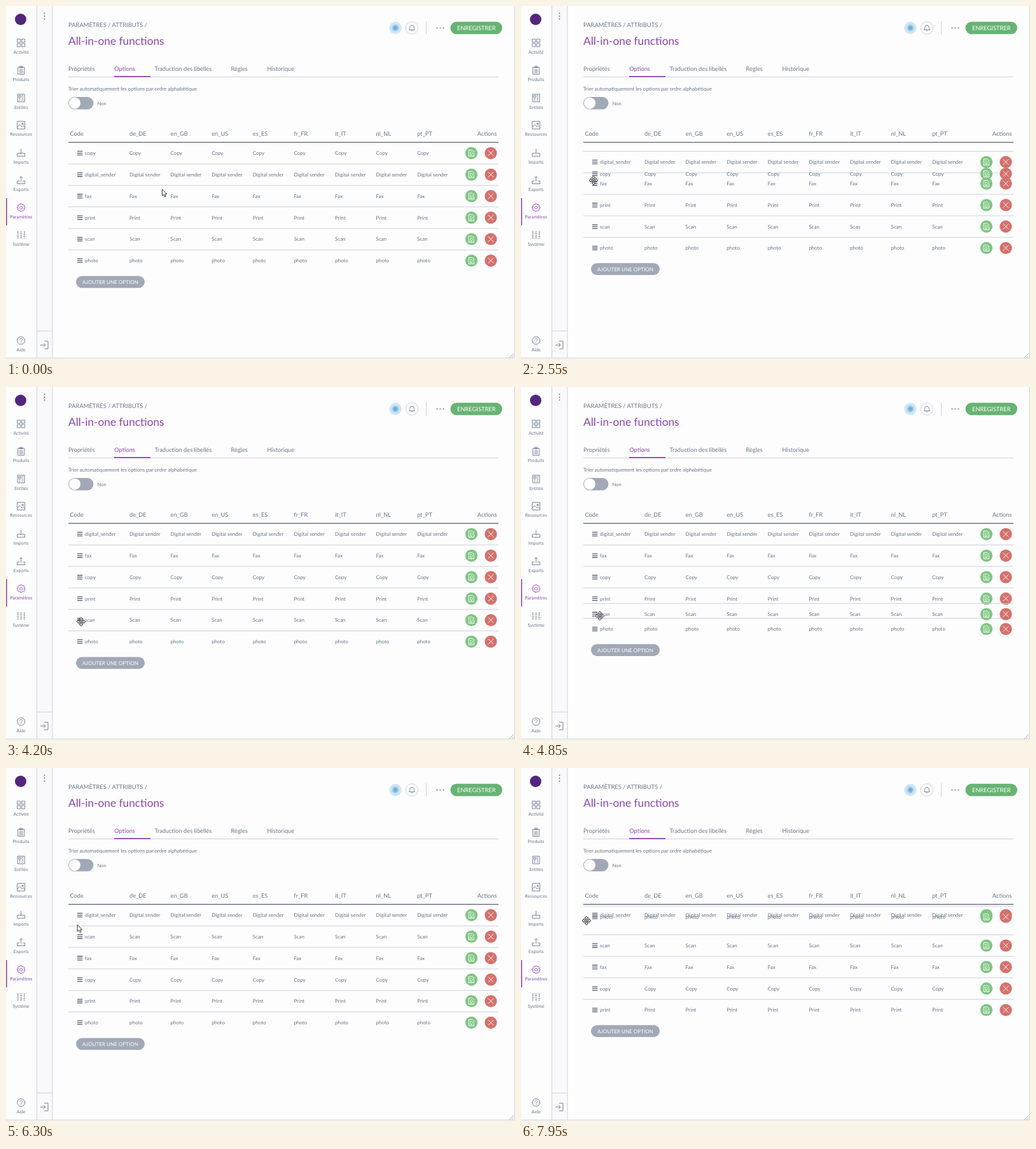
Recreate the animation shown at these times as an HTML page. Size 800 by 555 pixels, loop 8 s.

```html
<!DOCTYPE html>
<html lang="fr">
<head>
<meta charset="utf-8">
<title>Options</title>
<style>
  html, body { margin: 0; width: 100%; height: 100%; overflow: hidden; background: #fdfdfe; }
  svg { display: block; width: 100vw; height: 100vh; font-family: Lato, sans-serif; text-rendering: geometricPrecision; }
  text { fill: #67768a; }
  .icon { fill: none; stroke: #67768a; stroke-width: .9; }
  .icon.on { stroke: #9452ba; }
  text.on { fill: #8a45b0; }
  .rule { stroke: #cdd0d8; stroke-width: 1; }
  .white { fill: none; stroke: #fff; stroke-width: .9; }
</style>
</head>
<body>
<svg id="stage" viewBox="0 0 800 555">
  <defs>
    <radialGradient id="avatar"><stop offset=".2" stop-color="#6aaedb"/><stop offset=".65" stop-color="#cfe5f4"/></radialGradient>
  </defs>
  <rect x="48" width="25" height="554" fill="#f9f9fb"/>
  <path class="rule" d="M48.5 0V554M73 0V554M48 511H73M0 553.5H800M799.5 0V554"/>
  <path d="M791 553L798 546M794.5 553L798 549.5" stroke="#999" stroke-width=".8"/>
  <circle cx="23" cy="21" r="9" fill="#52267d"/>
  <g fill="#67768a">
    <circle cx="60.5" cy="11.5" r="1"/><circle cx="60.5" cy="16" r="1"/><circle cx="60.5" cy="20.5" r="1"/>
    <circle cx="677.5" cy="34.5" r="1"/><circle cx="682.5" cy="34.5" r="1"/><circle cx="687.5" cy="34.5" r="1"/>
  </g>
  <path class="icon" d="M60 527H66V539H60M54 533H62M59 530L62 533L59 536"/>
  <rect y="302" width="1.7" height="43" fill="#9452ba"/>
  <g id="nav"></g>

  <circle cx="612" cy="34.5" r="9.7" fill="url(#avatar)"/>
  <circle cx="638" cy="34.5" r="9.7" fill="#fff" stroke="#cdd0d8"/>
  <path class="icon" d="M633.5 37.5C635 36 634.5 35 634.8 33C635.2 29.5 640.8 29.5 641.2 33C641.5 35 641 36 642.5 37.5ZM637 39H639"/>
  <path class="rule" d="M660.5 24V45"/>
  <rect x="698.5" y="24.7" width="81.5" height="19.6" rx="9.8" fill="#67b373"/>
  <g id="words"></g>
  <path class="rule" d="M98 111.5H774"/>
  <path d="M170 111H227" stroke="#9452ba" stroke-width="1.8"/>
  <rect x="98" y="143" width="39.5" height="19.5" rx="9.75" fill="#a1a9b7"/>
  <circle cx="108" cy="152.7" r="9" fill="#fff"/>
  <g id="add">
    <rect x="110" y="-9.4" width="108" height="18.8" rx="9.4" fill="#a1a9b7"/>
    <text x="164" y="2.9" font-size="8.1" text-anchor="middle" style="fill:#fff">AJOUTER UNE OPTION</text>
  </g>
  <g id="rows"></g>
  <path d="M98 214.4H774" stroke="#566274" stroke-width="1.1"/>
  <path id="arrow" d="M0 0V10.5L2.4 8.3L4.1 12L5.8 11.2L4.2 7.6H7.4Z" fill="#fff" stroke="#222" stroke-width=".9"/>
  <g id="move">
    <path d="M0 -7L2.6 -4.2H1V-1H4.2V-2.6L7 0L4.2 2.6V1H1V4.2H2.6L0 7L-2.6 4.2H-1V1H-4.2V2.6L-7 0L-4.2 -2.6V-1H-1V-4.2H-2.6Z" fill="#fff" stroke="#222" stroke-width=".9"/>
    <path d="M-4.5 -4.5L4.5 4.5M4.5 -4.5L-4.5 4.5" stroke="#222" stroke-width=".8" stroke-dasharray="2 1"/>
  </g>
</svg>
<script>
const LOOP = 8000, FIRST_Y = 231.3, ROW_H = 33.8, GAP = 14;
const $ = id => document.getElementById(id);
const place = (el, x, y) => el.setAttribute('transform', `translate(${x} ${y})`);
const show = (el, on) => el.setAttribute('visibility', on ? 'visible' : 'hidden');
const label = (s, x, y, size, extra = '') =>
  `<text x="${x}" y="${y}" font-size="${size}" ${extra}>${s}</text>`;

// Left navigation: label, icon centre, icon path
const nav = [
  ['Activité', 58, 'M-6 -6H-1V-1H-6ZM1 -6H6V-1H1ZM-6 1H-1V6H-6ZM1 1H6V6H1Z'],
  ['Produits', 101.3, 'M-5 -5H5V6H-5ZM-2 -6.5H2V-4H-2ZM-3 -1H3M-3 1.3H3M-3 3.6H3'],
  ['Entités', 144.7, 'M-5.5 -6H5.5V6H-5.5ZM-3.5 -4H-.5V-1H-3.5ZM1 -4H3.5M1 -1.5H3.5M-3.5 1H-1M1 1H3.5M-3.5 3.5H-1M1 3.5H3.5'],
  ['Ressources', 187.3, 'M-6 -6H6V6H-6ZM-6 3L-2 -1L1.5 3L3.5 1L6 3.5M1.5 -3H3.5V-1H1.5Z'],
  ['Imports', 230.7, 'M-2.5 1H-6V5.5H6V1H2.5M0 -6V2M-2.5 -.5L0 2L2.5 -.5'],
  ['Exports', 274, 'M-2.5 1H-6V5.5H6V1H2.5M0 2V-6M-2.5 -3.5L0 -6L2.5 -3.5'],
  ['Paramètres', 317, 'M-1.3 -6H1.3L1.8 -4.3L3.8 -5L5.3 -3L4.3 -1.5L6.2 -.8V1L4.5 1.6L5 4L3 5.3L1.6 4.3L.8 6H-1L-1.6 4.4L-3.8 5L-5.3 3.2L-4.4 1.6L-6.2 .8V-1L-4.4 -1.6L-5 -3.8L-3.2 -5.2L-1.7 -4.3ZM-2.2 0A2.2 2.2 0 1 0 2.2 0A2.2 2.2 0 1 0 -2.2 0'],
  ['Système', 360, 'M-5 -6V0M-5 3V6M0 -6V-4M0 -1V6M5 -6V1M5 4V6M-6.5 1.5H-3.5M-1.5 -2.5H1.5M3.5 2.5H6.5'],
  ['Aide', 526, 'M-6 0A6 6 0 1 0 6 0A6 6 0 1 0 -6 0M-1.8 -1.5C-1.8 -4 1.8 -4 1.8 -1.5C1.8 0 0 0 0 1.6M0 2.6V3.6']
];
$('nav').innerHTML = nav.map(([s, y, d]) => {
  const on = s === 'Paramètres' ? 'on' : '';
  return `<path class="icon ${on}" d="${d}" transform="translate(23.7 ${y})"/>` +
    label(s, 23.7, y + 16.8, 7.1, `text-anchor="middle" class="${on}"`);
}).join('');

const langs = ['de_DE', 'en_GB', 'en_US', 'es_ES', 'fr_FR', 'it_IT', 'nl_NL', 'pt_PT'];
const colX = i => 194 + i * 64.6;
$('words').innerHTML = [
  label('PARAMÈTRES / ATTRIBUTS /', 98, 33.2, 9.4),
  label('All-in-one functions', 98, 61.3, 17.3, 'class="on"'),
  label('ENREGISTRER', 739.3, 37.9, 9.3, 'text-anchor="middle" style="fill:#fff"'),
  label('Propriétés', 98, 101.5, 9.25),
  label('Options', 170.3, 101.5, 9.25, 'class="on"'),
  label('Traduction des libellés', 233.5, 101.5, 9.25),
  label('Règles', 353.6, 101.5, 9.25),
  label('Historique', 410.6, 101.5, 9.25),
  label('Trier automatiquement les options par ordre alphabétique', 98, 133.4, 8),
  label('Non', 143.8, 155.9, 7.4),
  label('Code', 100.5, 204.3, 9.25),
  ...langs.map((s, i) => label(s, colX(i), 204.3, 9.25)),
  label('Actions', 771.5, 204.3, 9.25, 'text-anchor="end"')
].join('');

// Table rows, drawn around their own centre line
const values = { copy: 'Copy', digital_sender: 'Digital sender', fax: 'Fax', print: 'Print', scan: 'Scan', photo: 'photo' };
const rows = {};
for (const [code, value] of Object.entries(values)) {
  const g = rows[code] = document.createElementNS('http://www.w3.org/2000/svg', 'g');
  g.innerHTML = `<path class="rule" d="M98 -16.8H774"/>
    <path d="M112 -2.9H120.3M112 0H120.3M112 2.9H120.3" stroke="#4f5d70" stroke-width="1.3"/>` +
    label(code, 124, 2.9, 8) +
    langs.map((_, i) => label(value, colX(i), 2.9, 8)).join('') +
    `<circle cx="731.5" r="9.6" fill="#80c584"/>
    <path class="white" d="M733 -4.7H727.3V5H735.5V0M733 -4.7L735.5 -2M729 -1.5H732M729 1H731M729 3.2H733.5M731.7 2L736 -3"/>
    <circle cx="762" r="9.6" fill="#d4716c"/>
    <path class="white" d="M757.7 -4.3L766.3 4.3M766.3 -4.3L757.7 4.3"/>`;
  $('rows').append(g);
}

// Each drag: path of the row as [time, y], and the slots its gap takes as [time, index]
const drags = [
  { code: 'copy', end: 2950, path: [[2200, 231.3], [2550, 263.7], [2950, 298]], slots: [[2200, 0], [2600, 1], [2800, 2]] },
  { code: 'scan', end: 5960, path: [[4750, 366.5], [4850, 357.3], [5450, 267], [5550, 246]], slots: [[4750, 4], [5050, 3], [5250, 2], [5500, 1]] },
  { code: 'photo', end: LOOP, path: [[7300, 400.3], [7400, 371.5], [7650, 305], [7950, 234]], slots: [[7300, 5], [7500, 4], [7700, 3], [7800, 2], [7900, 1]] }
];
const pointer = [
  [50, 245.5, 288], [800, 190, 270], [900, 190, 270], [1700, 114, 240], [2200, 114, 240], [2550, 114, 274],
  [2950, 110, 307], [3350, 104, 293], [3450, 104, 293], [4200, 118, 369], [4300, 118, 369], [4600, 124, 372],
  [4750, 124, 372], [4850, 124, 360], [5450, 117, 267], [5550, 114, 247], [5950, 114, 247], [6750, 110, 246],
  [6850, 110, 246], [7200, 122, 402], [7300, 122, 402], [7400, 123, 361], [7950, 103, 240]
];
const moveSpans = [[1650, 3000], [4200, 6000], [7150, LOOP]];

function along(keys, t) {
  const i = keys.findIndex(k => k[0] > t);
  if (i === 0) return keys[0].slice(1);
  if (i < 0) return keys[keys.length - 1].slice(1);
  const [a, b] = [keys[i - 1], keys[i]], p = (t - a[0]) / (b[0] - a[0]);
  return a.slice(1).map((v, j) => v + (b[j + 1] - v) * p);
}

function draw(t) {
  let order = Object.keys(values), active = null, gap = 9, first = order[0];
  for (const d of drags) {
    const past = d.slots.filter(s => s[0] <= t);
    if (!past.length) break;
    order = order.filter(c => c !== d.code);
    const slot = past[past.length - 1][1];
    if (t < d.end) { active = d; gap = slot; break; }
    order.splice(slot, 0, d.code);
    first = order[0];
  }
  order.forEach((c, i) => place(rows[c], 0, FIRST_Y + i * ROW_H + (i >= gap ? GAP : 0)));
  for (const c in rows) show(rows[c].firstChild, c !== first);
  if (active) {
    place(rows[active.code], 0, along(active.path, t)[0]);
    if ($('rows').lastChild !== rows[active.code]) $('rows').append(rows[active.code]);
  }
  place($('add'), 0, active ? 413.7 : 433.8);

  const [x, y] = along(pointer, t), moving = moveSpans.some(([a, b]) => t >= a && t < b);
  place($('arrow'), x, y);
  place($('move'), x, y);
  show($('arrow'), !moving);
  show($('move'), moving);
}

const start = performance.now();
function tick() {
  draw((performance.now() - start) % LOOP);
  requestAnimationFrame(tick);
}
tick();
</script>
</body>
</html>
```
